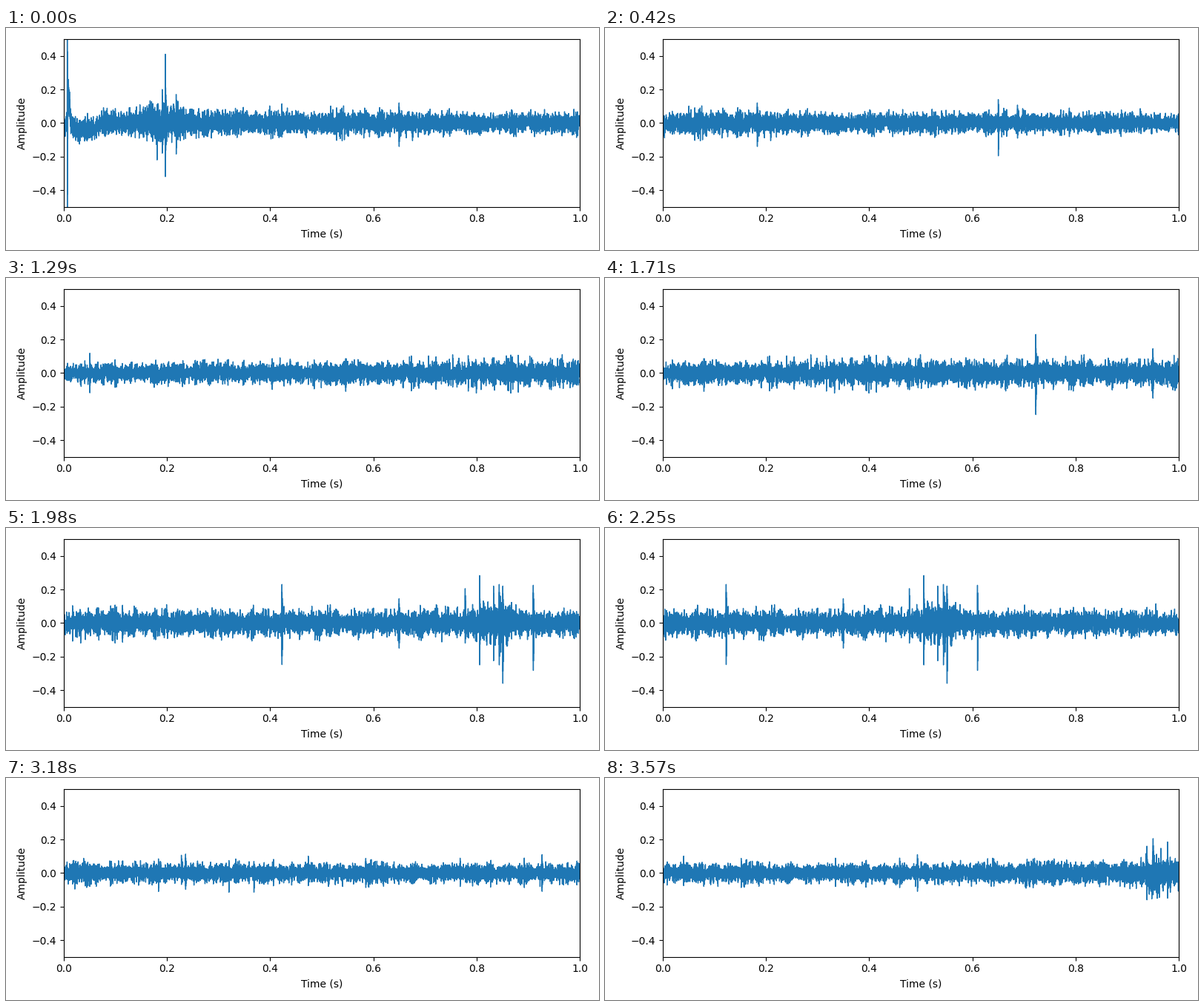
A matplotlib script for the animation above (3.6 s loop, 800 by 300 pixels).

```python
import numpy as np
import matplotlib.pyplot as plt
from matplotlib.animation import FuncAnimation

RATE = 9000          # samples per second
FRAMES = 120
INTERVAL = 30
STEP = RATE // 30    # samples scrolled per frame
CLICK = 0.007        # time of the opening click

# Loud knocks: time (s), highest and lowest value
KNOCKS = [
    (0.181, 0.11, -0.22), (0.191, 0.20, -0.18), (0.197, 0.41, -0.32),
    (0.218, 0.17, -0.185), (0.650, 0.12, -0.14), (1.117, 0.14, -0.196),
    (2.623, 0.23, -0.248), (2.850, 0.145, -0.15), (2.978, 0.205, -0.12),
    (3.006, 0.283, -0.25), (3.033, 0.22, -0.225), (3.044, 0.23, -0.25),
    (3.051, 0.22, -0.36), (3.110, 0.225, -0.283), (4.905, 0.16, -0.16),
    (4.917, 0.205, -0.13), (4.945, 0.185, -0.15),
]
CLUSTERS = (0.195, 3.045, 4.925)


def bump(t, center, width):
    return np.exp(-((t - center) / width) ** 2)


def loudness(t, rng):
    """Slow swell, extra noise around the knocks, and a fine random flutter."""
    level = 0.028 + 0.004 * np.cos(2 * np.pi * t / 2.75)
    level *= 1 + 0.7 * sum(bump(t, c, 0.03) for c in CLUSTERS)
    knots = np.arange(0, t[-1] + 0.01, 0.004)
    return level * np.interp(t, knots, rng.uniform(0.75, 1.3, knots.size))


def add_knock(signal, when, high, low, decay=9):
    """Swing between high and low, fading over a few samples."""
    start = round(when * RATE)
    k = np.arange(min(5 * decay, signal.size - start))
    swing = np.where(k % 2, low, high) * np.exp(-(k // 2 * 2) / decay)
    part = signal[start:start + k.size]
    part[:] = np.where(np.abs(swing) > np.abs(part), swing, part)


def make_signal():
    rng = np.random.default_rng(7)
    t = np.arange((FRAMES - 1) * STEP + RATE + 1) / RATE
    noise = np.clip(rng.standard_normal(t.size), -2.8, 2.8)
    signal = loudness(t, rng) * noise

    # The click leaves a short rise, then a slow dip
    signal += 0.12 * bump(t, CLICK + 0.0035, 0.003)
    signal -= 0.042 * bump(t, CLICK + 0.03, 0.024)

    # Small pops scattered over the whole recording
    for when in rng.uniform(0.1, t[-1], 50):
        high, low = rng.uniform(0.06, 0.12, 2)
        add_knock(signal, when, high, -low)
    for knock in KNOCKS:
        add_knock(signal, *knock)
    add_knock(signal, CLICK, 0.7, -0.7, decay=4)
    add_knock(signal, CLICK + 0.002, 0.26, -0.02, decay=30)
    return signal


signal = make_signal()
time = np.arange(RATE + 1) / RATE

fig, ax = plt.subplots(figsize=(8, 3), dpi=100)
line, = ax.plot(time, signal[:RATE + 1], linewidth=1)
ax.set_xlim(0, 1)
ax.set_ylim(-0.5, 0.5)
ax.set_xlabel("Time (s)")
ax.set_ylabel("Amplitude")
fig.tight_layout()


def update(frame):
    start = frame * STEP
    line.set_ydata(signal[start:start + RATE + 1])
    return line,


anim = FuncAnimation(fig, update, frames=FRAMES, interval=INTERVAL,
                     repeat=True, repeat_delay=0)
plt.show()
```
